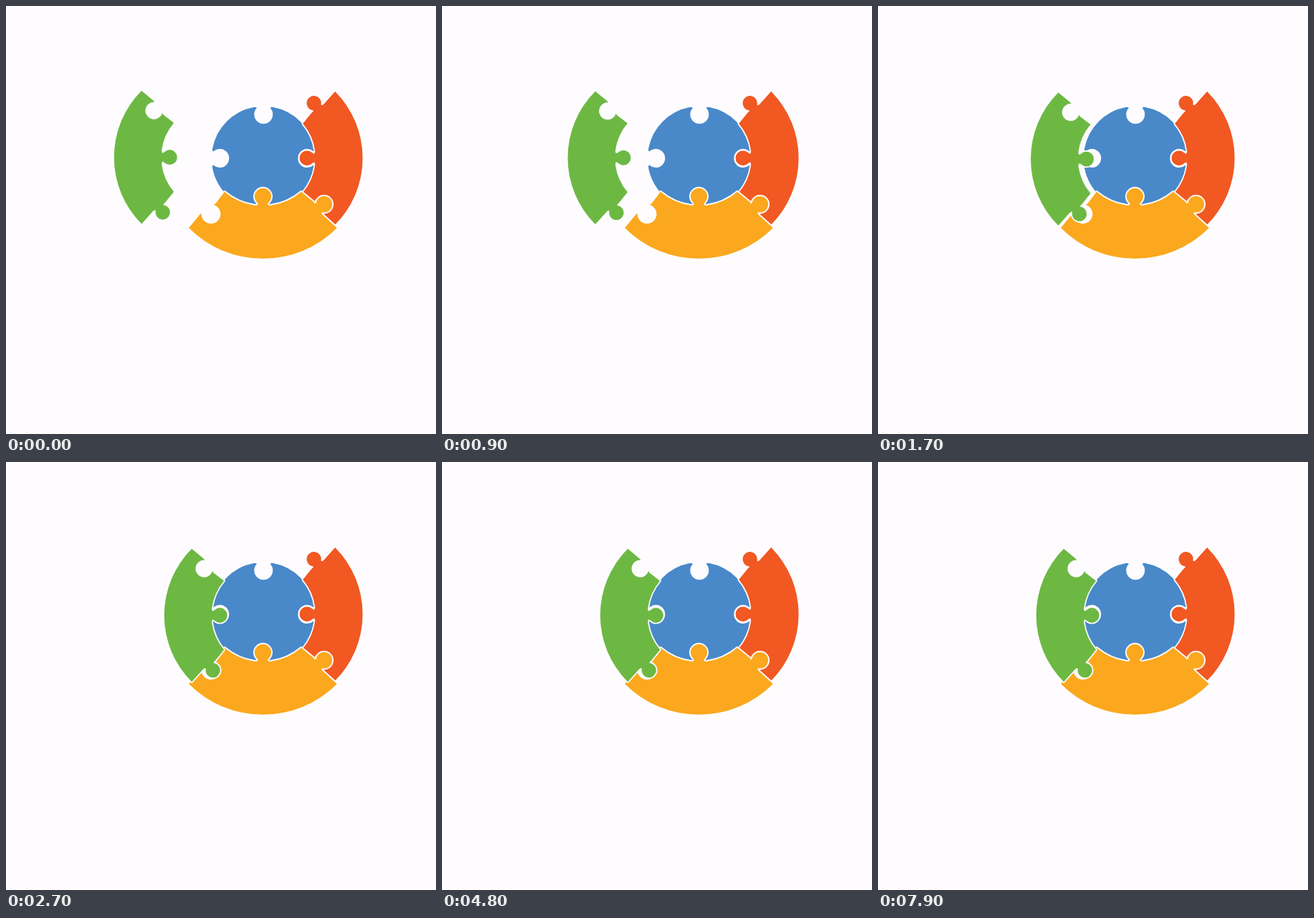
An HTML page with a canvas that plays this animation: 600x596 px, repeating every 8 s.

```html
<!DOCTYPE html>
<html lang="en">
<head>
<meta charset="utf-8">
<title>Puzzle ring</title>
<style>
  html, body { margin: 0; width: 100%; height: 100%; overflow: hidden; background: #fefcff; }
  canvas { display: block; }
</style>
</head>
<body>
<canvas id="stage" width="600" height="596"></canvas>
<script>
const ctx = document.getElementById('stage').getContext('2d');
const PAPER = '#fefcff';
const LOOP = 8000, STEP = 100;
const MOVE_START = 50, MOVE_TIME = 2100;
const QUARTER = Math.PI / 2, TILT = Math.PI / 18;

const pt = (x, y) => `${x.toFixed(2)} ${y.toFixed(2)} `;
const arcTo = (r, sweep, end) => `A${r} ${r} 0 0 ${sweep} ` + end;

// Round knob or socket centred on (cx, cy), set into the line through (px, py).
// neck = half width where the circle starts, w = half width of the shoulders.
function tab(px, py, angle, cx, cy, r, neck, w) {
  const ux = Math.cos(angle), uy = Math.sin(angle);
  const along = (cx - px) * ux + (cy - py) * uy;
  const fx = px + along * ux, fy = py + along * uy;
  const d = Math.hypot(cx - fx, cy - fy);
  const vx = (cx - fx) / d, vy = (cy - fy) / d;
  const at = (u, v) => pt(fx + u * ux + v * vx, fy + u * uy + v * vy);
  const s = Math.sqrt(r * r - neck * neck), h = d - s;
  const bend = neck - s * h / neck;
  const sweep = ux * vy - uy * vx < 0 ? 1 : 0;
  return {
    start: at(-w, 0),
    curve: 'Q' + at(-bend, 0) + at(-neck, h) +
      `A${r} ${r} 0 1 ${sweep} ` + at(neck, h) + 'Q' + at(bend, 0) + at(w, 0)
  };
}
const lineTab = t => 'L' + t.start + t.curve;
const arcTab = (r, sweep, t) => arcTo(r, sweep, t.start) + t.curve;

// Disc around the origin with a socket at the right, left and top.
function discPath(r, depth) {
  const w = 13, rim = Math.sqrt(r * r - w * w);
  const sockets = [0, 2, 3].map(i => {
    const a = i * QUARTER, x = Math.cos(a), y = Math.sin(a);
    return tab(x * rim, y * rim, a + QUARTER, x * depth, y * depth, 13, 10, w);
  });
  const [first, ...rest] = sockets;
  return new Path2D('M' + first.start + first.curve +
    rest.map(t => arcTab(r, 1, t)).join('') + arcTo(r, 1, first.start) + 'Z');
}

// Ring sector facing right: knob on the inner arc and upper side, socket below.
function sectorPath() {
  const depth = 45, inner = 48, outer = 92.7, innerR = 74, outerR = 131;
  const midX = depth / 2, midY = (inner + outer) / 2;
  const rise = Math.atan2(outer - inner, depth);
  const sag = innerR - Math.sqrt(innerR ** 2 - inner ** 2);
  const socket = tab(midX, midY, rise - Math.PI + TILT - 2 * rise + QUARTER, 27.7, 65, 12, 9, 12);
  const heart = tab(sag - 0.7, 0, -QUARTER, 5.8, 0, 10.4, 7.5, 10);
  const knob = tab(midX, -midY, TILT - rise, 15.5, -76.5, 10.2, 7.2, 10);
  return new Path2D('M' + pt(depth, -outer) +
    arcTo(outerR, 1, pt(depth, outer)) + lineTab(socket) + 'L' + pt(0, inner) +
    arcTab(innerR, 0, heart) + arcTo(innerR, 0, pt(0, -inner)) + lineTab(knob) + 'Z');
}

const disc = discPath(72.5, 61);
const sector = sectorPath();

function draw(path, color, x, y, turns = 0, scale = 1) {
  ctx.save();
  ctx.translate(x, y);
  ctx.rotate(turns * QUARTER);
  ctx.scale(scale, scale);
  ctx.stroke(path);
  ctx.fillStyle = color;
  ctx.fill(path);
  ctx.restore();
}

function render(now) {
  const t = Math.floor((now % LOOP) / STEP) * STEP;
  const k = Math.min(1, Math.max(0, (t - MOVE_START) / MOVE_TIME));
  const p = (1 - Math.cos(Math.PI * k)) / 2;

  ctx.fillStyle = PAPER;
  ctx.fillRect(0, 0, 600, 596);
  ctx.strokeStyle = PAPER;
  ctx.lineWidth = 3.4;
  ctx.lineJoin = 'round';
  draw(disc, '#4989c9', 359.3, 212);
  draw(sector, '#f15822', 414.2, 211.8);
  draw(sector, '#fba81e', 358.5, 258.8, 1, 1.115);
  draw(sector, '#6db843', 234.2 + 70 * p, 210.7 + 2.8 * p ** 1.4, 2);
}

const start = performance.now();
function tick() {
  render(performance.now() - start);
  requestAnimationFrame(tick);
}
tick();
</script>
</body>
</html>
```
